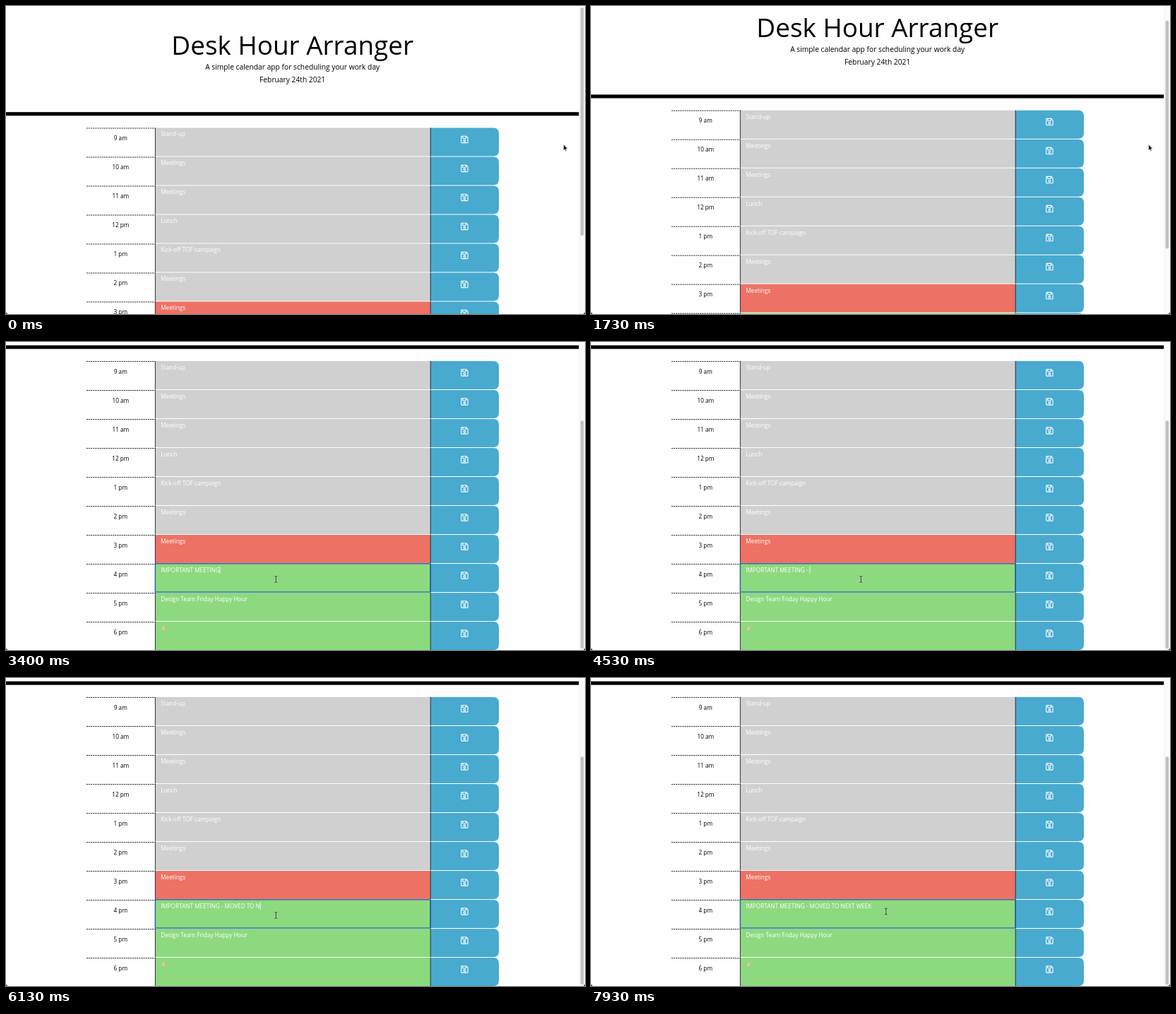
An HTML page for the animation above (8 s loop, 820 by 436 pixels).

```html
<!DOCTYPE html>
<html lang="en">
<head>
<meta charset="utf-8">
<title>Day planner</title>
<style>
  html, body { margin: 0; width: 100%; height: 100%; overflow: hidden; background: #fefefe; }
  svg { display: block; width: 820px; height: 436px; }
  text { font-family: "Open Sans", "Noto Sans", sans-serif; white-space: pre; }
  .mid { text-anchor: middle; }
  .small { font-size: 8.2px; }
  .lead { font-size: 10.25px; }
  .note { fill: #fff; }
</style>
</head>
<body>
<svg viewBox="0 0 820 436">
  <defs>
    <g id="save" fill="none" stroke="#fff" stroke-width="1.1">
      <path d="M-3.9-4.7H2.4L4.7-2.4V3.9q0,.8-.8,.8H-3.9q-.8,0-.8-.8V-3.9q0-.8,.8-.8Z"/>
      <path d="M-2.7-4.5V-1.6H2.1V-4.5"/>
      <circle cy="1.6" r="1.4"/>
    </g>
    <g id="hand" fill="#efc3a4" stroke="#d99f80" stroke-width=".3">
      <path d="M-1.6,0L-.6-3.4L.4-3.2L.5-1.4L1.6-3.8L2.5-3.4L1.9,.2Q2.2,3.4,0,3.6Q-2.4,3.4-2.2,.8Z"/>
    </g>
  </defs>
  <rect width="820" height="436" fill="#fefefe"/>
  <g id="page">
    <text class="mid" x="405.7" y="69" font-size="36.9">Desk Hour Arranger</text>
    <text class="mid lead" x="405.7" y="89.9">A simple calendar app for scheduling your work day</text>
    <text class="mid lead" x="405.7" y="108.1">February 24th 2021</text>
    <rect y="150.2" width="811.6" height="5.1"/>
    <g id="rows"></g>
    <rect id="ring" x="211.4" width="389.6" height="40.2" fill="none" stroke="#1d5fae" stroke-width="1.3"/>
    <rect id="caret" width=".8" height="10.4" fill="#fff"/>
  </g>
  <rect x="811.6" width="8.4" height="436" fill="#fafafa"/>
  <path d="M811.9,0V436" stroke="#ececec" stroke-width=".5"/>
  <rect id="thumb" x="813.6" width="4.6" height="323" rx="2.3" fill="#c1c1c1"/>
  <path d="M0,432Q0,436,4,436H0ZM820,432Q820,436,816,436H820Z" fill="#222"/>
  <path id="arrow" d="M0,0V8.6L2,6.8L3.3,9.7L4.6,9.1L3.4,6.3H6.1Z" stroke="#fff" stroke-width=".7"/>
  <g id="beam" fill="none">
    <path d="M-2-4.5Q0-4.5,0-3.5Q0-4.5,2-4.5M0-3.7V3.7M-2,4.5Q0,4.5,0,3.5Q0,4.5,2,4.5" stroke="#fff" stroke-opacity=".6" stroke-width="1.9"/>
    <path d="M-2-4.5Q0-4.5,0-3.5Q0-4.5,2-4.5M0-3.7V3.7M-2,4.5Q0,4.5,0,3.5Q0,4.5,2,4.5" stroke="#111" stroke-width=".9"/>
  </g>
</svg>
<script>
const LOOP = 8000, TOP = 172.5, PITCH = 41, MAX_SCROLL = 145.5;
const PAST = '#d0d0d0', NOW = '#ed7265', NEXT = '#8dd980', BLUE = '#48aacf';
const EDITED = 7, TEXT_X = 219.2, CLICK = 3200;
const TYPED = ' - MOVED TO NEXT WEEK';

const slots = [
  ['9 am', 'Stand-up'], ['10 am', 'Meetings'], ['11 am', 'Meetings'],
  ['12 pm', 'Lunch'], ['1 pm', 'Kick-off TOF campaign'], ['2 pm', 'Meetings'],
  ['3 pm', 'Meetings'], ['4 pm', 'IMPORTANT MEETING'],
  ['5 pm', 'Design Team Friday Happy Hour'], ['6 pm', '']
];

const el = id => document.getElementById(id);
const rowTop = i => TOP + PITCH * i;
const clamp = u => Math.max(0, Math.min(1, u));
const smooth = u => u * u * (3 - 2 * u);
const span = (t, a, b) => smooth(clamp((t - a) / (b - a)));
const show = (node, on) => node.setAttribute('visibility', on ? 'visible' : 'hidden');
const place = (node, x, y) => node.setAttribute('transform', `translate(${x} ${y})`);

el('rows').innerHTML = slots.map(([time, note], i) => {
  const color = i < 6 ? PAST : i === 6 ? NOW : NEXT;
  return `<g transform="translate(0 ${rowTop(i)})">
    <path d="M114,.5H211" stroke="#222" stroke-dasharray="2 1.1"/>
    <text class="mid small" x="162.3" y="17.5">${time}</text>
    <rect x="211" width="390.5" height="40" fill="${color}"/>
    <path d="M601,0H690.3Q698,0,698,7.7V32.3Q698,40,690.3,40H601Z" fill="${BLUE}"/>
    <path d="M211.4,0V40.5M601.2,0V40.5" stroke="#222" stroke-width=".9"/>
    <text class="small note" x="${TEXT_X}" y="11.9">${note}</text>
    <use href="#save" x="649.4" y="16.4"/>
  </g>`;
}).join('') + `<use href="#hand" x="223" y="${rowTop(9) + 9}"/>`;

const note = document.querySelectorAll('.note')[EDITED];
el('ring').setAttribute('y', rowTop(EDITED) - .2);
el('caret').setAttribute('y', rowTop(EDITED) + 3.6);

// Three keys, a pause, then two even bursts.
const keyTime = k =>
  k < 3 ? 4200 + 115 * k : k < 13 ? 5000 + 115 * (k - 3) : 6260 + 120 * (k - 13);
const keys = [...TYPED].map((_, k) => keyTime(k));

function pointer(t) {
  const u = span(t, 2560, 3100), v = clamp((t - 7790) / 140) ** 1.5;
  return [789.5 - 407.2 * u + 35.5 * v, 196 + 140 * u - 5.5 * v];
}

function draw(t) {
  const scroll = MAX_SCROLL * span(t, 1525, 2310);
  place(el('page'), 0, -scroll);
  el('thumb').setAttribute('y', 2 + scroll * .75);

  const count = keys.filter(k => k <= t).length;
  note.textContent = slots[EDITED][1] + TYPED.slice(0, count);

  const focused = t >= CLICK;
  const lastInput = count ? keys[count - 1] : CLICK;
  show(el('ring'), focused);
  show(el('caret'), focused && (t - lastInput) % 1000 < 500);
  el('caret').setAttribute('x', TEXT_X + note.getComputedTextLength());

  const [x, y] = pointer(t), overText = x < 601;
  show(el('arrow'), !overText);
  show(el('beam'), overText);
  place(el('arrow'), x, y);
  place(el('beam'), x, y);
}

const start = performance.now();
function tick() {
  draw((performance.now() - start) % LOOP);
  requestAnimationFrame(tick);
}
tick();
</script>
</body>
</html>
```
